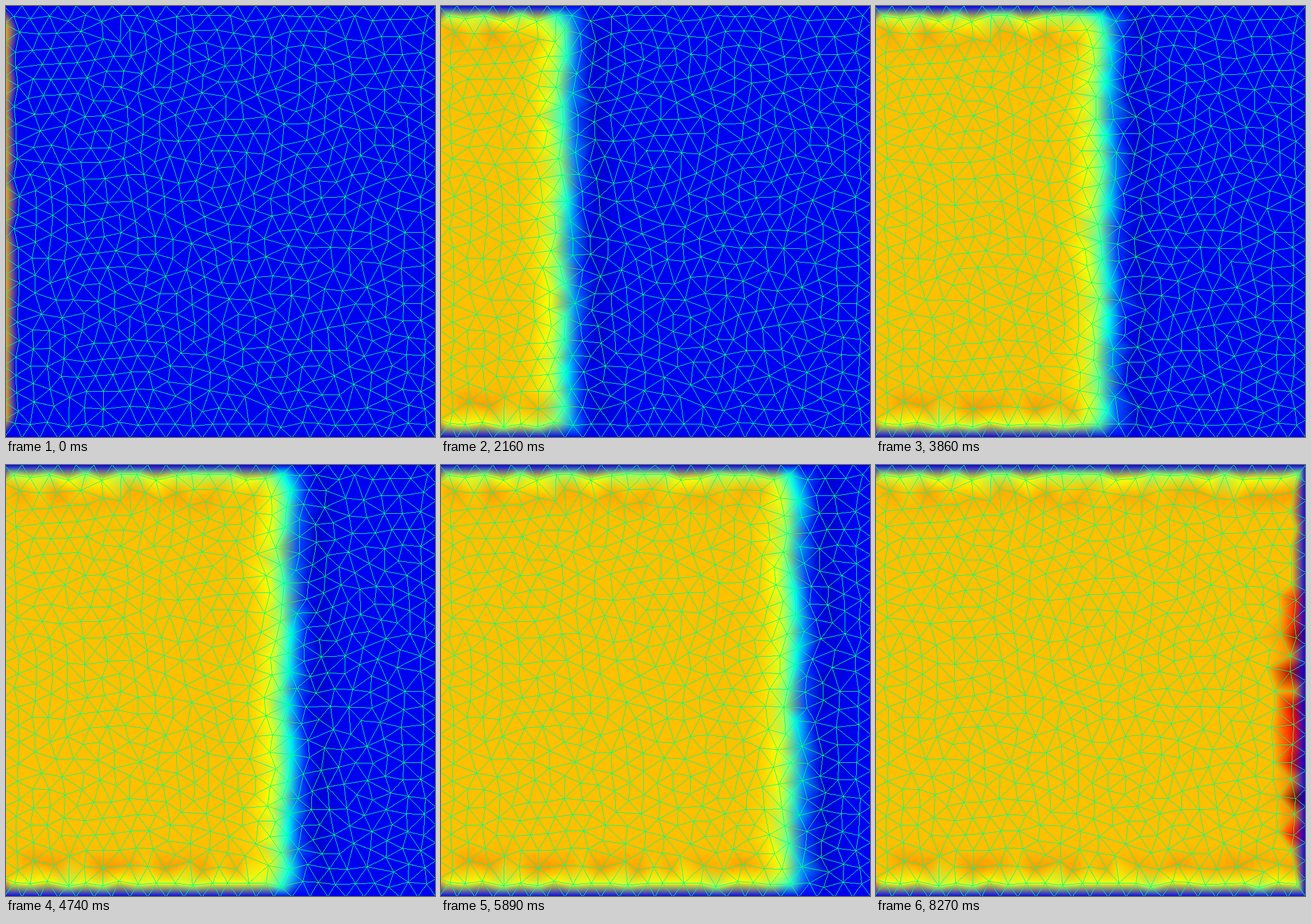
Write an HTML page with a canvas that moves like this. It is 746 px wide and 751 px high and loops after 8.32 s.

```html
<!DOCTYPE html>
<html lang="en">
<head>
<meta charset="utf-8">
<title>Front moving through a triangle mesh</title>
<style>
  html, body { margin: 0; width: 100%; height: 100%; overflow: hidden; background: #0000f0; }
  canvas { display: block; }
</style>
</head>
<body>
<canvas id="stage" width="746" height="751"></canvas>
<script>
const W = 746, H = 751, LOOP = 8320;
const LEFT = -4, RIGHT = 747, TOP = -1, BOTTOM = 752, CELLS = 24;
const LINE = 0xff80ff00;
const ctx = document.getElementById('stage').getContext('2d');
const image = ctx.createImageData(W, H);
const pixels = new Uint32Array(image.data.buffer);
const clamp = (v, a = 0, b = 1) => Math.min(b, Math.max(a, v));
const bump = (v, center, size) => Math.exp(-(((v - center) / size) ** 2));

let seed = 20457;
function random() {
  seed = (seed + 0x6d2b79f5) | 0;
  let t = Math.imul(seed ^ (seed >>> 15), 1 | seed);
  t = (t + Math.imul(t ^ (t >>> 7), 61 | t)) ^ t;
  return ((t ^ (t >>> 14)) >>> 0) / 4294967296;
}

// ---- mesh nodes: even border, one row of apexes inside it, the rest scattered and relaxed
function makeNodes() {
  const nodes = [];
  const add = (x, y, side) => nodes.push({ x, y, side, noise: random() });
  const dx = (RIGHT - LEFT) / CELLS, dy = (BOTTOM - TOP) / CELLS;
  for (let k = 0; k < CELLS; k++) {
    const u = k + random() * 0.003;
    add(LEFT + u * dx, TOP, 'top');
    add(RIGHT, TOP + u * dy, 'right');
    add(RIGHT - u * dx, BOTTOM, 'bottom');
    add(LEFT, BOTTOM - u * dy, k ? 'left' : 'bottom');
  }
  const along = k => k + 0.5 + (random() - 0.5) * 0.25;
  const depth = () => 16 + 12 * random();
  for (let k = 0; k < CELLS; k++) {
    add(LEFT + along(k) * dx, TOP + depth());
    add(LEFT + along(k) * dx, BOTTOM - depth());
    if (k === 0 || k === CELLS - 1) continue;
    add(LEFT + depth(), TOP + along(k) * dy);
    add(RIGHT - depth(), TOP + along(k) * dy);
  }

  const firstFree = nodes.length;
  for (let i = 0; i < 12000; i++) {
    const x = 30 + random() * 685, y = 30 + random() * 690;
    if (nodes.every(p => Math.hypot(p.x - x, p.y - y) > 24)) add(x, y);
  }
  const reach = 32;
  for (let pass = 0; pass < 24; pass++) {
    for (const p of nodes.slice(firstFree)) {
      let mx = 0, my = 0;
      for (const q of nodes) {
        const ex = p.x - q.x, ey = p.y - q.y;
        if (q === p || Math.abs(ex) > reach || Math.abs(ey) > reach) continue;
        const d = Math.hypot(ex, ey);
        if (d > reach || d === 0) continue;
        const push = 0.14 * (reach - d) / d;
        mx += ex * push;
        my += ey * push;
      }
      p.x = clamp(p.x + mx, 20, 725);
      p.y = clamp(p.y + my, 22, 730);
    }
  }
  return nodes;
}

// ---- Delaunay triangulation by incremental insertion
function triangulate(nodes) {
  const n = nodes.length;
  const pts = nodes.concat({ x: -9000, y: -8000 }, { x: 9700, y: -8100 }, { x: 400, y: 20000 });
  const circle = (a, b, c) => {
    const A = pts[a], bx = pts[b].x - A.x, by = pts[b].y - A.y;
    const cx = pts[c].x - A.x, cy = pts[c].y - A.y;
    const d = 2 * (bx * cy - by * cx), b2 = bx * bx + by * by, c2 = cx * cx + cy * cy;
    const ux = (cy * b2 - by * c2) / d, uy = (bx * c2 - cx * b2) / d;
    return { a, b, c, x: A.x + ux, y: A.y + uy, r2: ux * ux + uy * uy };
  };
  let tris = [circle(n, n + 1, n + 2)];
  for (let i = 0; i < n; i++) {
    const p = pts[i], rim = new Map(), keep = [];
    const toggle = (a, b) => {
      const key = Math.min(a, b) * 4096 + Math.max(a, b);
      if (!rim.delete(key)) rim.set(key, [a, b]);
    };
    for (const t of tris) {
      if ((p.x - t.x) ** 2 + (p.y - t.y) ** 2 < t.r2) {
        toggle(t.a, t.b);
        toggle(t.b, t.c);
        toggle(t.c, t.a);
      } else keep.push(t);
    }
    for (const [a, b] of rim.values()) keep.push(circle(a, b, i));
    tris = keep;
  }
  return tris.filter(t => t.a < n && t.b < n && t.c < n);
}

// ---- hard one-pixel lines, stored once as pixel offsets
function traceLines(nodes, tris) {
  const offsets = new Set();
  const trace = (a, b) => {
    const p = nodes[Math.min(a, b)], q = nodes[Math.max(a, b)];
    const len = Math.ceil(Math.max(Math.abs(q.x - p.x), Math.abs(q.y - p.y)));
    for (let i = 0; i <= len; i++) {
      const x = Math.round(p.x + (q.x - p.x) * i / len);
      const y = Math.round(p.y + (q.y - p.y) * i / len);
      if (x >= 0 && x < W && y >= 0 && y < H) offsets.add(y * W + x);
    }
  };
  for (const t of tris) {
    trace(t.a, t.b);
    trace(t.b, t.c);
    trace(t.c, t.a);
  }
  return [...offsets];
}

// ---- field value at a node after a number of steps
function level(p, step) {
  if (p.side === 'left') return 1;
  if (p.side) return 0;
  const front = 2 + 11.35 * step + 3 * Math.sin(p.y / 37) * Math.min(1, step / 8);
  const s = p.x - front;
  const width = (2 + 14 * (1 - Math.exp(-step / 4))) * (s > 0 ? 0.85 : 1);
  const dip = 0.09 * Math.min(1, step / 10) * bump(s, 47, 25);
  const wave = 1 / (1 + Math.exp(s / width)) - dip;

  const d = Math.min(p.y, H - p.y);
  const wall = 1 - Math.exp(-d / 12) + 0.09 * p.noise * bump(d, 50, 18);

  // ripple that builds up along the right wall
  const edge = Math.exp(-(((RIGHT - p.x) / 36) ** 4));
  const span = clamp((p.y - 205) / 40) * clamp((670 - p.y) / 40);
  const ripple = 0.38 + 0.28 * Math.cos((p.y - 290) * Math.PI / 36);
  return wave * wall + ripple * edge * span * clamp((step - 65) / 12);
}

function jet(c) {
  const v = clamp(0.11 + 0.577 * c);
  return [3, 2, 1].map(k => 255 * clamp(1.5 - Math.abs(4 * v - k)));
}

function fillTriangle(p, q, r, cp, cq, cr) {
  const area = (q.x - p.x) * (r.y - p.y) - (q.y - p.y) * (r.x - p.x);
  if (Math.abs(area) < 1e-6) return;
  const x0 = Math.max(0, Math.floor(Math.min(p.x, q.x, r.x)));
  const x1 = Math.min(W - 1, Math.ceil(Math.max(p.x, q.x, r.x)));
  const y0 = Math.max(0, Math.floor(Math.min(p.y, q.y, r.y)));
  const y1 = Math.min(H - 1, Math.ceil(Math.max(p.y, q.y, r.y)));
  const ux = (q.y - r.y) / area, uy = (r.x - q.x) / area;
  const vx = (r.y - p.y) / area, vy = (p.x - r.x) / area;
  for (let y = y0; y <= y1; y++) {
    for (let x = x0; x <= x1; x++) {
      const u = ux * (x - q.x) + uy * (y - q.y);
      const v = vx * (x - r.x) + vy * (y - r.y);
      const w = 1 - u - v;
      if (u < -1e-7 || v < -1e-7 || w < -1e-7) continue;
      const red = u * cp[0] + v * cq[0] + w * cr[0] + 0.5;
      const green = u * cp[1] + v * cq[1] + w * cr[1] + 0.5;
      const blue = u * cp[2] + v * cq[2] + w * cr[2] + 0.5;
      pixels[y * W + x] = 0xff000000 | (blue << 16) | (green << 8) | red;
    }
  }
}

const nodes = makeNodes();
const tris = triangulate(nodes);
const lines = traceLines(nodes, tris);

function draw(step) {
  const colors = nodes.map(p => jet(level(p, step)));
  pixels.fill(0xfff00000);
  for (const { a, b, c } of tris) {
    fillTriangle(nodes[a], nodes[b], nodes[c], colors[a], colors[b], colors[c]);
  }
  for (const i of lines) pixels[i] = LINE;
  ctx.putImageData(image, 0, 0);
}

// ---- steps come in bursts with a shared rhythm and a pause after each
const BURSTS = [4, 9, 6, 9, 6, 9, 6, 3, 6, 6, 3, 6, 4];
const RHYTHM = [90, 90, 130, 90, 110, 90, 90, 130], PAUSE = 150;
const times = [];
let at = 80;
for (const count of BURSTS) {
  for (let i = 0; i < count; i++) {
    times.push(at);
    at += i < count - 1 ? RHYTHM[i] : PAUSE;
  }
}

let start = null, shown = 0;
function tick(now) {
  if (start === null) start = now;
  const t = (now - start) % LOOP;
  const step = times.filter(time => time <= t).length;
  if (step !== shown) draw(shown = step);
  requestAnimationFrame(tick);
}
draw(0);
requestAnimationFrame(tick);
</script>
</body>
</html>
```
